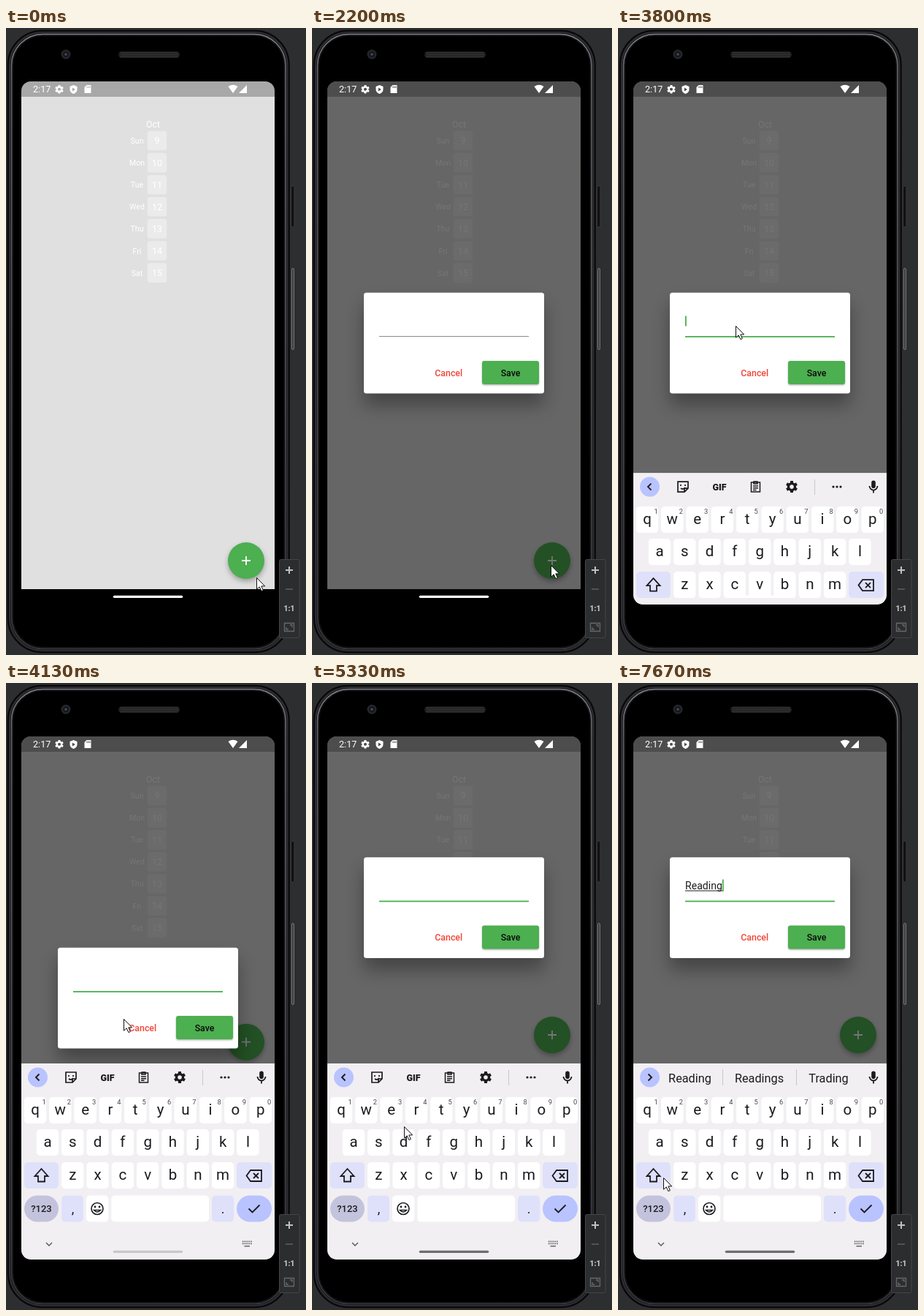
An HTML page with a canvas that plays this animation: 411 px wide and 857 px high, repeating every 8 s.

```html
<!DOCTYPE html>
<html lang="en">
<head>
<meta charset="utf-8">
<title>Add entry dialog</title>
<style>
html, body { margin: 0; width: 100%; height: 100%; overflow: hidden; background: #2d2e30; }
canvas { display: block; width: 411px; height: 857px; }
</style>
</head>
<body>
<canvas id="stage"></canvas>
<script>
const W = 411, H = 857, LOOP = 8000;
const canvas = document.getElementById('stage');
const dpr = window.devicePixelRatio || 1;
canvas.width = W * dpr;
canvas.height = H * dpr;
const c = canvas.getContext('2d');

const GREEN = '#4caf50', INK = '#1b1b1f', TINT = '#dfe1fb', ACCENT = '#b9c3ff';
const DIALOG_RISE = 123.5, KEYS_TOP = 520, KEYS_H = 268;

// Pointer tip: time, x, y
const POINTER = [
  [70, 324, 729], [1660, 324, 729], [1730, 325, 730], [1870, 325, 730], [2000, 327, 734],
  [2340, 327, 734], [3000, 161, 407], [3900, 161, 407], [4130, 161, 459], [4330, 162, 500],
  [4670, 167, 608], [4870, 167, 608], [5330, 126, 606], [5670, 68, 677], [5730, 66, 676],
  [6070, 66, 676], [6130, 62, 676]
];
const WORD = 'Reading';
const TYPED = [6070, 6270, 6670, 7000, 7270, 7400, 7600];
const HINTS = [
  [6330, 'Re', 'Read', 'Really'], [6730, 'Rea', 'Read', 'Really'], [7070, 'Read', 'Ready', 'Reading'],
  [7330, 'Readi', 'Reading', 'Readings'], [7470, 'Readin', 'Reading', 'Readings'],
  [7660, 'Reading', 'Readings', 'Trading']
];

const clamp = v => Math.min(1, Math.max(0, v));
const span = (t, from, to) => clamp((t - from) / (to - from));
const easeOut = p => 1 - (1 - p) ** 2;
const smooth = p => p * p * (3 - 2 * p);
const mix = (a, b, p) => a + (b - a) * p;

function box(x, y, w, h, r, fill, stroke, lw = 1) {
  c.beginPath();
  c.roundRect(x, y, w, h, r);
  if (fill) { c.fillStyle = fill; c.fill(); }
  if (stroke) { c.strokeStyle = stroke; c.lineWidth = lw; c.stroke(); }
}
function disc(x, y, r, fill) {
  c.beginPath();
  c.arc(x, y, r, 0, 7);
  c.fillStyle = fill;
  c.fill();
}
function line(d, color, lw, x = 0, y = 0) {
  c.save();
  c.translate(x, y);
  c.strokeStyle = color;
  c.lineWidth = lw;
  c.stroke(new Path2D(d));
  c.restore();
}
function shape(d, color, x = 0, y = 0) {
  c.save();
  c.translate(x, y);
  c.fillStyle = color;
  c.fill(new Path2D(d), 'evenodd');
  c.restore();
}
function text(s, x, y, size, color, align = 'center', weight = 400) {
  c.font = `${weight} ${size}px Roboto, sans-serif`;
  c.textAlign = align;
  c.fillStyle = color;
  c.fillText(s, x, y);
}
function withShadow(color, blur, dy, draw) {
  c.save();
  c.shadowColor = color;
  c.shadowBlur = blur * dpr;
  c.shadowOffsetY = dy * dpr;
  draw();
  c.restore();
}
function gear(x, y, r, color) {
  c.beginPath();
  c.arc(x, y, r * .56, 0, 7);
  c.strokeStyle = color;
  c.lineWidth = r * .42;
  c.stroke();
  c.beginPath();
  for (let i = 0; i < 6; i++) {
    const a = i * Math.PI / 3 + Math.PI / 6;
    c.moveTo(x + Math.cos(a) * r * .65, y + Math.sin(a) * r * .65);
    c.lineTo(x + Math.cos(a) * r, y + Math.sin(a) * r);
  }
  c.lineWidth = r * .5;
  c.stroke();
}

// Metal rim: lit from the top, fading towards the bottom
const rim = c.createLinearGradient(0, 4, 0, 853);
rim.addColorStop(0, '#85858a');
rim.addColorStop(.08, '#66666c');
rim.addColorStop(.5, '#54545a');
rim.addColorStop(1, '#3a3a3e');

function drawPhone() {
  c.fillStyle = '#2d2e30';
  c.fillRect(0, 0, W, H);
  box(390.5, 216, 4.5, 56, 2, '#111113', '#3a3a3d');
  box(391.5, 328.5, 3, 111, 1.5, '#3b3b3e', '#77787b');
  box(2.5, 3.5, 385.5, 850, 47, '#111114', '#060607', 1.5);
  box(5, 6, 380.5, 845, 45, null, '#2e2e32', 2);
  box(7.5, 8.5, 375.5, 840, 43, null, rim, 1.5);
  box(9.5, 10.5, 371.5, 836, 41, '#000', '#151517', 1);
  disc(82, 36, 6.5, '#26272b');
  disc(82, 36, 4, '#15161c');
  disc(82, 36, 1.8, '#444a5e');
  box(154, 32, 84, 9, 4.5, '#1d1d1e');
  for (let i = 0; i < 38; i++)
    for (let j = 0; j < 3; j++) disc(157 + i * 2.1 + j % 2, 34 + j * 2.5, .7, '#4b4b4d');
}

function drawFab(y) {
  withShadow('rgba(0,0,0,.3)', 7, 3.5, () => disc(329, y, 25, GREEN));
  line('M-6 0H6M0 -6V6', '#fff', 1.8, 329, y);
}

function drawApp(t) {
  c.fillStyle = '#e0e0e0';
  c.fillRect(21, 73, 347, 694);
  text('Oct', 201.5, 136, 12.36, '#fff');
  ['Sun', 'Mon', 'Tue', 'Wed', 'Thu', 'Fri', 'Sat'].forEach((day, i) => {
    const y = 154 + i * 30.1;
    text(day, 179.5, y + 4, 10.6, '#fff');
    box(193.8, y - 13.3, 26.4, 26.6, 3.5, '#ebebeb');
    text(9 + i, 207, y + 4.4, 12.36, '#fff');
  });
  drawFab(mix(728, 481, easeOut(span(t, 3810, 4210))));
  c.fillStyle = 'rgba(0,0,0,.25)';
  c.fillRect(21, 73, 347, 21);
}

function drawStatus() {
  text('2:17', 37, 88.4, 12.6, '#fff', 'left');
  gear(73, 83.8, 5.8, '#fff');
  shape('M0 -6L5 -4V0Q5 4 0 6Q-5 4 -5 0V-4ZM-1.6 -2.6V2.6L2.4 0Z', '#fff', 92.5, 84);
  shape('M-1.5 -5.5H4.5V5.5H-4.5V-2.5ZM-1.5 -4V-1.5H-.5V-4ZM.6 -4V-1.5H1.6V-4ZM2.6 -4V-1.5H3.5V-4Z', '#fff', 112, 83.5);
  shape('M-6.5 -3.5Q0 -8 6.5 -3.5L0 5.5Z', '#fff', 311, 83.5);
  shape('M5.5 -5.5V5.5H-5.5Z', '#fff', 324.5, 83.5);
}

function drawDialog(t) {
  const shown = span(t, 1860, 2080);
  if (!shown) return;
  c.save();
  c.globalAlpha = easeOut(shown);
  c.translate(0, -DIALOG_RISE * easeOut(span(t, 4150, 4330)));
  withShadow('rgba(0,0,0,.33)', 25, 16, () => box(71, 361.7, 247, 137.8, 3.5, '#fff'));
  if (t < 3530) {
    c.fillStyle = '#8a8a8a';
    c.fillRect(92, 421, 205, 1);
  } else {
    c.fillStyle = GREEN;
    c.fillRect(92, 421, 205, 1.8);
  }
  const typed = WORD.slice(0, TYPED.filter(at => t >= at).length);
  text(typed, 92, 405, 14.1, '#1d1d1d', 'left');
  const end = 92 + c.measureText(typed).width;
  if (typed) {
    c.fillStyle = '#1d1d1d';
    c.fillRect(92, 407, end - 92, 1);
  }
  const blinkOn = typed || t >= 3530 && (t - 3370) % 1000 < 500;
  if (blinkOn) {
    c.fillStyle = GREEN;
    if (typed) c.fillRect(end, 392, 1.8, 16.5);
    else c.fillRect(92, 393.5, 1.8, 14);
  }
  text('Cancel', 187.2, 475.5, 12.36, '#f44336', 'center', 500);
  withShadow('rgba(0,0,0,.32)', 2.5, 1.2, () => box(233, 455, 78, 32, 3, GREEN));
  text('Save', 272, 475.5, 12.36, '#0a0a0a', 'center', 500);
  c.restore();
}

function drawTools() {
  line('M-2 -7H7V2L2 7H-7V-7ZM7 2H2V7M-3 -3V-1M3 -3V-1M-3 2Q0 4.5 3 1', INK, 1.7, 89, 539);
  text('GIF', 139, 543.6, 12.5, INK, 'center', 900);
  line('M-6 -6H6V7H-6ZM-2.5 -7H2.5V-4H-2.5ZM-3.5 -1H3.5M-3.5 1.7H3.5M-3.5 4.3H1', INK, 1.5, 188.5, 539);
  gear(238, 539, 8, INK);
  line('M269.5 529V550', '#c8c6cc', 1);
  for (const x of [295, 300, 305]) disc(x, 539, 1.6, INK);
}

function drawHints(t) {
  const words = HINTS.filter(h => t >= h[0]).pop() || HINTS[0];
  [98.5, 193.5, 288.5].forEach((x, i) => text(words[i + 1], x, 545.8, 16.3, INK));
  line('M143.5 528V550M244.5 528V550', '#c8c6cc', 1);
}

function key(x, cy, w, fill, r = 5) {
  box(x, cy - 18, w, 36, r, fill);
}

function drawKeyboard(t) {
  const up = easeOut(span(t, 3673, 3973));
  if (!up) return;
  c.save();
  c.translate(0, KEYS_H * (1 - up));
  c.fillStyle = '#f2eff3';
  c.fillRect(21, KEYS_TOP, 347, KEYS_H);

  const swap = span(t, 6290, 6440);
  disc(43.5, 539, 13.5, ACCENT);
  line(swap < .5 ? 'M2 -4.5L-2.5 0L2 4.5' : 'M-2 -4.5L2.5 0L-2 4.5', INK, 1.9, 43.5, 539);
  c.globalAlpha = 1 - swap;
  if (swap < 1) drawTools();
  c.globalAlpha = swap;
  if (swap > 0) drawHints(t);
  c.globalAlpha = 1;
  box(347.2, 530.5, 5.6, 10.5, 2.8, INK);
  line('M-5.5 -1A5.5 5.5 0 0 0 5.5 -1M0 4.5V8.5', INK, 1.8, 350, 539);

  [['qwertyuiop', 40, 584], ['asdfghjkl', 57, 628], ['zxcvbnm', 91.3, 673]].forEach(([row, x0, y], n) => {
    [...row].forEach((ch, i) => {
      const x = x0 + i * 34.3;
      key(x - 15.2, y, 30.4, '#fff');
      text(ch, x, y + 6.4, 20.5, INK);
      if (!n) text((i + 1) % 10, x + 12, 576.3, 9.3, '#45454b');
    });
  });
  key(25, 673, 47, TINT);
  line('M0 -9L9 1H4.5V8.5H-4.5V1H-9Z', INK, 1.8, 48.5, 673);
  key(316, 673, 48, TINT);
  line('M-10.5 0L-5 -7.5H10V7.5H-5ZM-1 -3.5L6 3.5M6 -3.5L-1 3.5', INK, 1.8, 340, 673.5);

  key(25, 718.5, 47, '#c3c3dd', 18);
  text('?123', 48.5, 723.2, 13, INK, 'center', 500);
  key(76, 718.5, 30, TINT);
  text(',', 91.5, 724.5, 18, INK);
  key(110, 718.5, 30.4, '#fff');
  line('M8 0A8 8 0 1 1 -8 0A8 8 0 1 1 8 0M-4.5 2Q0 7 4.5 2Z', INK, 1.6, 125, 718.5);
  disc(122, 716, 1.4, INK);
  disc(128, 716, 1.4, INK);
  key(144.3, 718.5, 133.7, '#fff');
  key(282, 718.5, 30.3, TINT);
  text('.', 297, 724.5, 18, INK);
  key(316, 718.5, 48, ACCENT, 18);
  line('M-7.5 0L-2.5 5L7.5 -5', INK, 1.8, 340, 718.5);

  line('M-4 -2L0 2L4 -2', '#55555b', 1.4, 59, 767);
  for (let i = 0; i < 5; i++)
    for (let j = 0; j < 2; j++) box(323.8 + i * 2.8, 762.5 + j * 3, 1.7, 1.8, 0, '#66666c');
  box(326.5, 769, 7.5, 1.6, 0, '#66666c');
  c.restore();
}

function drawHandle(t) {
  const grey = mix(mix(255, 200, span(t, 3930, 4100)), 110, span(t, 4950, 5150));
  box(146.8, 775.7, 95.4, 3.2, 1.6, `rgb(${grey},${grey},${grey})`);
}

function drawToolbar() {
  box(374.5, 726.5, 27.5, 107, 2, '#2c2d2f', '#454649');
  line('M-5 0H5M0 -5V5', '#bfc0c2', 2, 388, 741);
  line('M-5 0H5', '#5d5e61', 1.6, 388, 767);
  text('1:1', 388, 796.7, 10.2, '#bfc0c2', 'center', 800);
  line('M-6.5 -5.5H6.5V5.5H-6.5ZM-4 0V3H-1M1 -3H4V0', '#67686b', 1.3, 388, 819);
}

function pointerAt(t) {
  if (t < 70) return [343, 751];
  const next = POINTER.findIndex(p => p[0] > t);
  if (next < 0) return POINTER[POINTER.length - 1].slice(1);
  const a = POINTER[next - 1], b = POINTER[next];
  const p = smooth(span(t, a[0], b[0]));
  return [mix(a[1], b[1], p), mix(a[2], b[2], p)];
}

function drawPointer(t) {
  const [x, y] = pointerAt(t);
  const arrow = 'M.5 .5V16.2L4.2 12.8L6.9 18.6L9.4 17.5L6.8 11.9H11.7Z';
  shape(arrow, '#fff', x, y);
  line(arrow, '#111', 1, x, y);
}

function draw(t) {
  c.setTransform(dpr, 0, 0, dpr, 0, 0);
  drawPhone();
  c.save();
  c.beginPath();
  c.roundRect(21, 73, 347, 715, 13);
  c.clip();
  drawApp(t);
  c.fillStyle = `rgba(0,0,0,${.54 * easeOut(span(t, 1860, 2080))})`;
  c.fillRect(21, 73, 347, 694);
  c.save();
  c.beginPath();
  c.rect(21, 73, 347, 694);
  c.clip();
  drawDialog(t);
  c.restore();
  drawStatus();
  drawKeyboard(t);
  drawHandle(t);
  c.restore();
  drawToolbar();
  drawPointer(t);
}

const start = performance.now();
function tick() {
  draw((performance.now() - start) % LOOP);
  requestAnimationFrame(tick);
}
tick();
</script>
</body>
</html>
```
